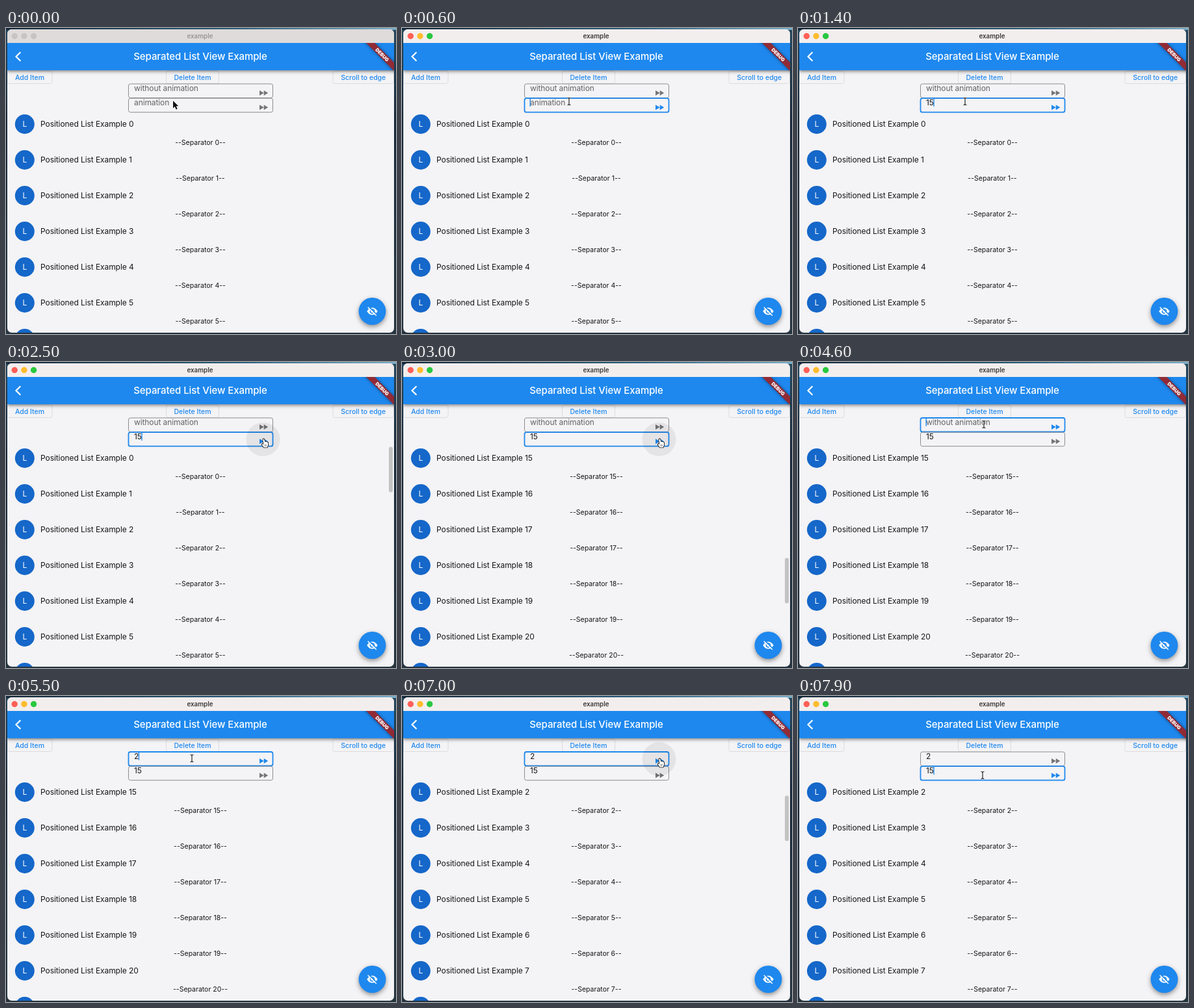
Recreate the animation shown at these times as an HTML page with a canvas. Size 600 by 471 pixels, loop 8000 ms.

```html
<!DOCTYPE html>
<html lang="en">
<head>
<meta charset="utf-8">
<title>Separated list</title>
<style>
html, body { margin: 0; width: 100%; height: 100%; overflow: hidden; background: #1c2836; }
canvas { display: block; width: 600px; height: 471px; }
</style>
</head>
<body>
<canvas id="stage" width="600" height="471"></canvas>
<script>
const ctx = document.getElementById('stage').getContext('2d');
const LOOP = 8000, STEP = 100, ROW = 55, LIST_TOP = 130;
const BLUE = '#1e88ee', DARK_BLUE = '#1567c9', PAPER = '#f4f3f5', INK = '#161616';

// Pointer stops: time, x, y
const POINTER = [
  [0, 257, 113], [1500, 257, 113], [2300, 396, 119], [3500, 396, 119],
  [4200, 286, 96], [5700, 286, 96], [6400, 396, 97], [7100, 396, 97], [7600, 284, 122]
];
const ACTIVATE = 300, SCROLL = 2500, SCROLL_TIME = 400, JUMP = 6700;
// Focus changes and key strokes: time, focused field, text of both fields
const INPUT = [
  [0, -1, '', ''], [ACTIVATE, 1, '', ''], [900, 1, '', '1'], [1100, 1, '', '15'],
  [4500, 0, '', '15'], [5200, 0, '2', '15'], [7700, 1, '2', '15']
];

const clamp = v => Math.max(0, Math.min(1, v));
const ease = v => v * v * (3 - 2 * v);

function pointerAt(t) {
  const i = POINTER.findLastIndex(p => p[0] <= t);
  const [t0, x0, y0] = POINTER[i];
  const [t1, x1, y1] = POINTER[i + 1] || [LOOP, x0, y0];
  const k = ease((t - t0) / (t1 - t0));
  return [x0 + (x1 - x0) * k, y0 + (y1 - y0) * k];
}

function firstItem(t) {
  return t >= JUMP ? 2 : 15 * ease(clamp((t - SCROLL) / SCROLL_TIME));
}

function text(str, x, mid, size, { color = INK, weight = 400, align = 'left', spacing = 0 } = {}) {
  ctx.font = `${weight} ${size}px Inter, Roboto, sans-serif`;
  ctx.letterSpacing = spacing + 'px';
  ctx.textAlign = align;
  ctx.fillStyle = color;
  ctx.fillText(str, x, mid + size * 0.364);
}

function disc(x, y, r, color) {
  ctx.fillStyle = color;
  ctx.beginPath();
  ctx.arc(x, y, r, 0, Math.PI * 2);
  ctx.fill();
}

function box(x, y, w, h, r, fill, stroke, line = 1) {
  ctx.beginPath();
  ctx.roundRect(x, y, w, h, r);
  if (fill) { ctx.fillStyle = fill; ctx.fill(); }
  if (stroke) { ctx.strokeStyle = stroke; ctx.lineWidth = line; ctx.stroke(); }
}

function shape(d, fill, stroke, line = 1) {
  const path = new Path2D(d);
  if (stroke) { ctx.strokeStyle = stroke; ctx.lineWidth = line; ctx.stroke(path); }
  if (fill) { ctx.fillStyle = fill; ctx.fill(path); }
}

function at(x, y, draw) {
  ctx.save();
  ctx.translate(x, y);
  draw();
  ctx.restore();
}

function shadow(color, blur, dy, draw) {
  ctx.save();
  ctx.shadowColor = color;
  ctx.shadowBlur = blur;
  ctx.shadowOffsetY = dy;
  draw();
  ctx.restore();
}

function desktop() {
  const side = ctx.createLinearGradient(0, 0, 0, 471);
  side.addColorStop(0, '#25485e');
  side.addColorStop(0.3, '#18283a');
  side.addColorStop(1, '#263440');
  ctx.fillStyle = side;
  ctx.fillRect(0, 0, 600, 471);
  const sky = ctx.createLinearGradient(0, 0, 600, 0);
  sky.addColorStop(0, '#15293a');
  sky.addColorStop(0.6, '#2d5f7c');
  sky.addColorStop(1, '#79aec8');
  ctx.fillStyle = sky;
  ctx.fillRect(0, 0, 600, 3);
}

function list(t) {
  const first = firstItem(t);
  ctx.save();
  ctx.beginPath();
  ctx.rect(2, LIST_TOP, 595, 339);
  ctx.clip();
  for (let n = Math.floor(first); n < first + 7; n++) {
    const y = 148 + (n - first) * ROW;
    disc(28.8, y, 15, DARK_BLUE);
    text('L', 28.8, y, 12, { color: '#fff', align: 'center' });
    text('Positioned List Example ' + n, 53, y, 12, { spacing: -0.08 });
    text(`--Separator ${n}--`, 299, y + 28, 10.5, { align: 'center' });
  }
  ctx.restore();

  const since = t >= JUMP ? t - JUMP : t - SCROLL - SCROLL_TIME;
  const alpha = t < SCROLL ? 0 : 1 - clamp((since - 600) / 300);
  if (alpha) box(589, 130.5 + first * 11.4, 6, 70, 3, `rgba(0,0,0,${0.2 * alpha})`);
}

function button(label, x, w) {
  box(x, 66, w, 19.5, 3, null, '#dcdbde');
  text(label, x + w / 2, 76, 10.5, { color: BLUE, weight: 500, align: 'center' });
}

function field(y, label, value, focused, caret) {
  const edge = focused ? BLUE : '#8d8c8e';
  box(188.5, y, 222, 21.5, 3, null, edge, focused ? 1.8 : 1);
  text(value || label, 197, y + 6.3, 12, { color: value ? INK : '#626164', spacing: -0.1 });
  if (caret) {
    const end = value ? ctx.measureText(value).width : 0;
    ctx.fillStyle = BLUE;
    ctx.fillRect(196.5 + end, y - 0.3, 1.4, 13);
  }
  at(390, y + 14, () => shape('M0-4 6.7 0 0 4ZM6.7-4 13.2 0 6.7 4Z', focused ? BLUE : '#757477'));
}

function appBar() {
  shadow('rgba(0,0,0,.45)', 5, 2, () => {
    ctx.fillStyle = BLUE;
    ctx.fillRect(2, 23, 595, 42);
  });
  shape('M22.3 37.2 15.5 44 22.3 50.8', null, '#fff', 2.2);
  text('Separated List View Example', 299, 44, 15,
    { color: '#fff', weight: 500, align: 'center', spacing: -0.08 });

  ctx.save();
  ctx.beginPath();
  ctx.rect(2, 23, 595, 60);
  ctx.clip();
  at(578.8, 41.2, () => {
    ctx.rotate(Math.PI / 4);
    shadow('rgba(0,0,0,.5)', 5, 0, () => box(-40, -4.6, 80, 9.2, 0, '#912b36'));
    text('DEBUG', 0, 0, 7.4, { color: '#fff', weight: 900, align: 'center' });
  });
  ctx.restore();
}

function titleBar(active) {
  ctx.fillStyle = active ? '#f3eeee' : '#dfdbda';
  ctx.fillRect(2, 2, 595, 21);
  ['#ff5f57', '#febc2e', '#28c840'].forEach((color, i) =>
    disc(13.2 + i * 14.7, 12.5, 4.7, active ? color : '#c8c4c3'));
  text('example', 298.5, 12.2, 9.8,
    { color: active ? '#3c3939' : '#9a9695', weight: 600, align: 'center' });
}

function hideButton() {
  shadow('rgba(0,0,0,.4)', 7, 3, () => disc(563.5, 436, 21, BLUE));
  at(563.5, 436, () => {
    shape('M-8.2 0Q-5-5.6 0-5.6T8.2 0Q5 5.6 0 5.6T-8.2 0Z', '#fff');
    disc(0, 0, 3.8, BLUE);
    disc(0, 0, 2.3, '#fff');
    shape('M-5.8-7.6 7.4 5.6', null, BLUE, 1.7);
    shape('M-6.8-6.3 6.3 6.8', null, '#fff', 1.5);
  });
}

function pointer(x, y, active) {
  at(x, y, () => {
    if (!active) {
      shape('M0-1V10.5L2.7 8 4.8 12.4 6.7 11.5 4.7 7.2H8.3Z', '#111', '#fff', 1.6);
    } else if (x > 383) {
      ctx.lineJoin = 'round';
      shape('M-.8 0Q.5-1.2 1.4.2L2.4 4 4.2 3.6 5.6 4.3 7 5V9L5.8 12.5H.7L-2.3 8.4Q-2.6 6.7-.8 7.3L.3 8.1Z',
        '#fff', '#111', 1.7);
      shape('M2.4 8V10.5M4.2 8V10.5', null, '#333', 0.7);
    } else {
      const beam = 'M-2.5-5.5Q0-5.5 0-4Q0-5.5 2.5-5.5M0-4V4M-2.5 5.5Q0 5.5 0 4Q0 5.5 2.5 5.5';
      shape(beam, null, 'rgba(255,255,255,.8)', 2.2);
      shape(beam, null, '#222', 1.2);
    }
  });
}

function draw(t) {
  const active = t >= ACTIVATE;
  const [since, focus, top, bottom] = INPUT.findLast(s => s[0] <= t);
  const caret = (t - since) % 1000 < 500;
  const [px, py] = pointerAt(t);

  desktop();
  ctx.save();
  ctx.beginPath();
  ctx.roundRect(2, 2, 595, 467, 7);
  ctx.clip();
  ctx.fillStyle = PAPER;
  ctx.fillRect(0, 0, 600, 471);
  list(t);
  button('Add Item', 2, 69);
  button('Delete Item', 246.5, 81);
  button('Scroll to edge', 503, 93.5);
  field(86, 'without animation', top, focus === 0, focus === 0 && caret);
  field(108.2, 'animation', bottom, focus === 1, focus === 1 && caret);
  if (px > 383) disc(395.5, py < 108 ? 97 : 119, 26, 'rgba(0,0,0,.065)');
  appBar();
  titleBar(active);
  hideButton();
  ctx.restore();
  pointer(px, py, active);
}

function frame(now) {
  draw(Math.floor(now % LOOP / STEP) * STEP);
  requestAnimationFrame(frame);
}
requestAnimationFrame(frame);
</script>
</body>
</html>
```
